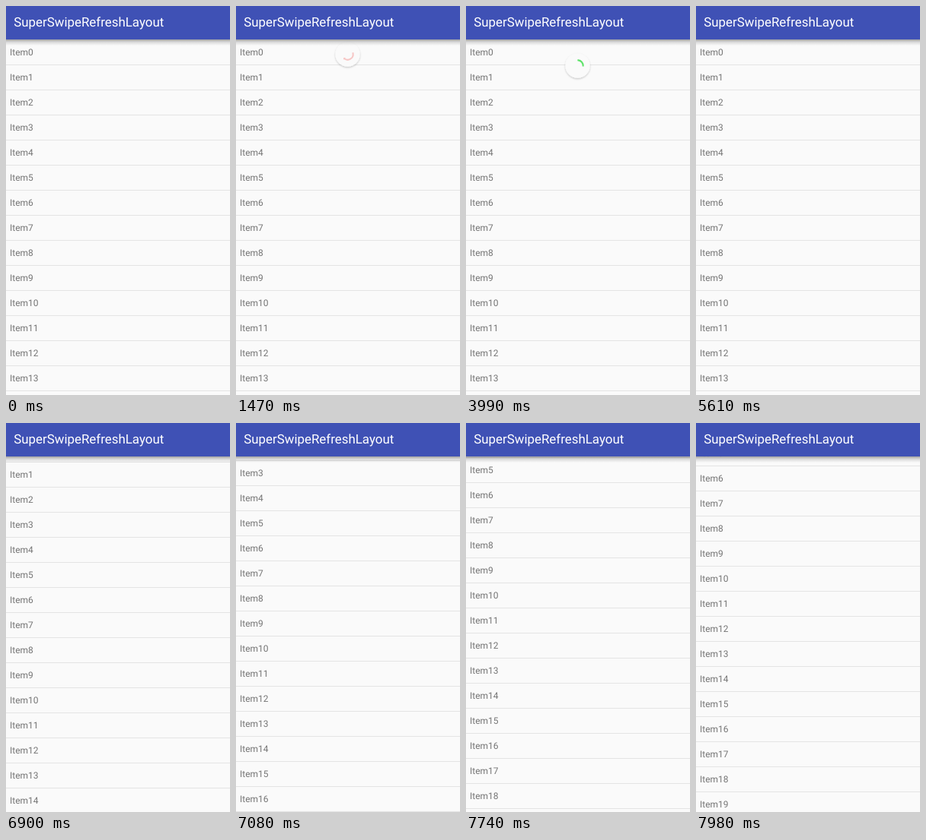
Animation of 294 by 512 pixels, one loop 8000 ms. Source, as an HTML page:

```html
<!DOCTYPE html>
<html lang="en">
<head>
<meta charset="utf-8">
<title>SuperSwipeRefreshLayout</title>
<style>
  html, body { margin: 0; width: 100%; height: 100%; overflow: hidden; background: #fafafa; }
  svg { display: block; width: 100%; height: 100%; }
  text { font-family: Roboto, sans-serif; text-rendering: geometricPrecision; }
  #list text { font-size: 12px; fill: #757575; }
  #list rect { fill: #e4e4e4; }
</style>
</head>
<body>
<svg viewBox="0 0 294 512" xmlns="http://www.w3.org/2000/svg">
  <defs>
    <linearGradient id="shade" x1="0" y1="0" x2="0" y2="1">
      <stop offset="0" stop-color="#000" stop-opacity=".36"/>
      <stop offset=".4" stop-color="#000" stop-opacity=".14"/>
      <stop offset="1" stop-color="#000" stop-opacity="0"/>
    </linearGradient>
    <filter id="lift" x="-30%" y="-30%" width="160%" height="160%">
      <feDropShadow dx="0" dy="1.2" stdDeviation="1.2" flood-color="#000" flood-opacity=".22"/>
    </filter>
  </defs>
  <rect width="294" height="512" fill="#fafafa"/>
  <g id="list"></g>
  <g id="badge">
    <circle r="16.2" fill="#fafafa" filter="url(#lift)"/>
    <g id="ring">
      <path id="arc" fill="none" stroke-width="2.05" stroke-linecap="square"/>
      <path id="arrow"/>
    </g>
  </g>
  <rect y="44" width="294" height="8" fill="url(#shade)"/>
  <rect width="294" height="44" fill="#3f51b5"/>
  <text x="10.2" y="27" font-size="16.9" fill="#fff">SuperSwipeRefreshLayout</text>
</svg>
<script>
const LOOP = 8000, STEP = 30;
const ROW = 33, TOP = 44, ROWS = 22;
const RADIUS = 7.17, PULL = 52.5, REST_Y = 78.5;
const RED = '#f0524f', GREEN = '#5fe36a';

// Timeline in ms
const DRAG = 1300, DRAG_END = 2580, RELEASE = 2835, SPIN = 3144, CYCLE = 3810,
      HIDE = 5430, GONE = 5610, SCROLL = 6870;

const $ = id => document.getElementById(id);
const list = $('list'), badge = $('badge'), ring = $('ring'), arc = $('arc'), arrow = $('arrow');
const clamp = (v, lo = 0, hi = 1) => Math.min(hi, Math.max(lo, v));
const lerp = (a, b, p) => a + (b - a) * p;
const span = (t, from, to) => clamp((t - from) / (to - from));

let rows = '';
for (let i = 0; i < ROWS; i++) {
  const y = TOP + i * ROW;
  rows += `<text x="5" y="${y + 21.3}">Item${i}</text><rect y="${y + ROW}" width="294" height="1"/>`;
}
list.innerHTML = rows;

// cubic-bezier(.4, 0, .2, 1)
function ease(x) {
  x = clamp(x);
  let lo = 0, hi = 1, s = 0.5;
  for (let i = 0; i < 24; i++) {
    s = (lo + hi) / 2;
    const bx = 1.2 * s * (1 - s) ** 2 + 0.6 * s * s * (1 - s) + s ** 3;
    if (bx < x) lo = s; else hi = s;
  }
  return s * s * (3 - 2 * s);
}

// Finger drag: circle height, arc length and rotation with overscroll tension
function pull(t) {
  const d = 2.24 * (1 - (1 - span(t, DRAG, DRAG_END)) ** 2.57);
  const reach = Math.min(1, d);
  const x = clamp(d - 1, 0, 2) / 4;
  const tension = 2 * (x - x * x);
  const grown = Math.max(reach - 0.4, 0) * 5 / 3;
  const start = (-0.25 + 0.4 * grown + 2 * tension) * 180;
  return {
    y: 27.5 + PULL * reach + 2 * PULL * tension,
    start, end: start + 288 * grown, head: grown,
    alpha: d < 1 ? 0.3 : lerp(0.3, 1, clamp((d - 1) / 0.6)),
    color: RED, scale: 1
  };
}

function pose(t) {
  const p = pull(t);
  if (t < RELEASE) return p;
  const back = span(t, RELEASE, SPIN);
  p.y = lerp(p.y, REST_Y, 1 - (1 - back) ** 4);
  p.head = 1 - back;
  if (t >= CYCLE) {
    const n = Math.floor((t - CYCLE) / 1333), u = (t - CYCLE) / 1333 - n;
    const base = 236 + n * 594 + 306 * u;
    p.start = base + 288 * ease(2 * u - 1);
    p.end = base + 288 * ease(2 * u);
    p.color = GREEN;
  } else if (t >= SPIN) {
    const f = span(t, SPIN, CYCLE);
    const turn = lerp(p.start, 308, f);
    p.start = turn + 288 * f;
    p.end = turn + 288;
  }
  p.scale = 1 - span(t, HIDE, GONE);
  return p;
}

function arcPath(start, end) {
  end = Math.max(end, start + 0.5);
  const at = deg => {
    const a = deg * Math.PI / 180;
    return `${(RADIUS * Math.cos(a)).toFixed(3)} ${(RADIUS * Math.sin(a)).toFixed(3)}`;
  };
  return `M${at(start)}A${RADIUS} ${RADIUS} 0 ${end - start > 180 ? 1 : 0} 1 ${at(end)}`;
}

function drawBadge(t) {
  const shown = t > DRAG && t < GONE;
  badge.setAttribute('visibility', shown ? 'visible' : 'hidden');
  if (!shown) return;
  const p = pose(t);
  badge.setAttribute('transform', `translate(146.5 ${p.y.toFixed(2)}) scale(${p.scale})`);
  ring.setAttribute('opacity', p.alpha);
  arc.setAttribute('d', p.end > p.start ? arcPath(p.start, p.end) : '');
  arc.setAttribute('stroke', p.color);
  const left = RADIUS - 4.6 * p.head, w = 8.2 * p.head;
  arrow.setAttribute('d', p.head > 0 ? `M${left} 0h${w}l${-w / 2} ${w / 2}z` : '');
  arrow.setAttribute('transform', `rotate(${p.end - 5})`);
  arrow.setAttribute('fill', p.color);
}

// Quick flick that settles into a slow steady drag
function scrollAt(t) {
  const s = Math.max(0, t - SCROLL);
  return Math.round(82 * (1 - Math.exp(-s / 89)) + 0.0938 * s);
}

function draw(now) {
  const t = Math.floor((now % LOOP) / STEP) * STEP;
  list.setAttribute('transform', `translate(0 ${-scrollAt(t)})`);
  drawBadge(t);
}

function tick() {
  draw(performance.now());
  requestAnimationFrame(tick);
}
tick();
</script>
</body>
</html>
```
